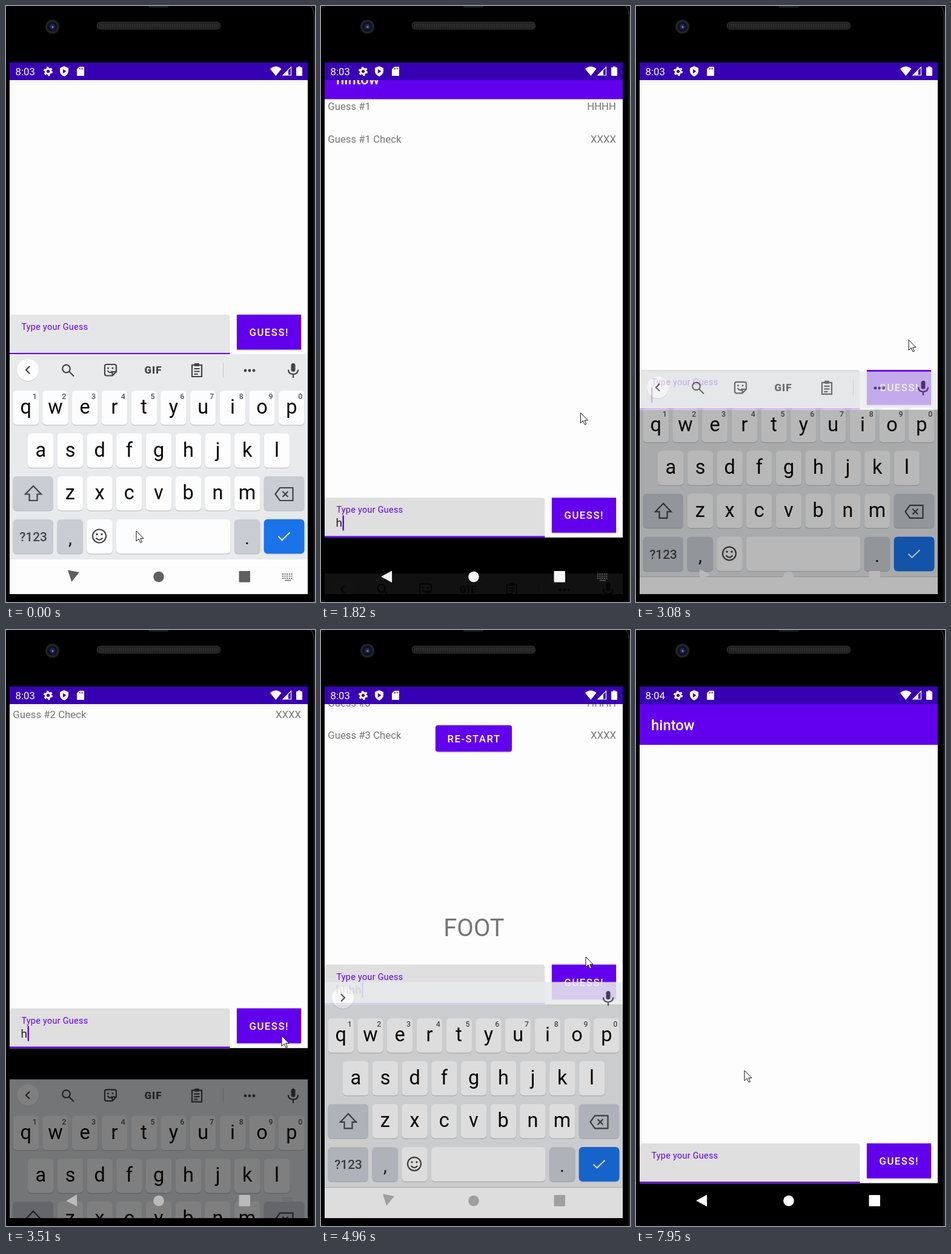
Animation, 510 px wide and 981 px high, one loop 8000 ms. Source, as an HTML page:

```html
<!DOCTYPE html>
<html lang="en">
<head>
<meta charset="utf-8">
<title>Word guessing app</title>
<style>
html, body { margin: 0; width: 100%; height: 100%; overflow: hidden; background: #000; }
svg { display: block; }
text { font-family: Roboto, sans-serif; white-space: pre; }
.medium { font-weight: 500; }
.button { font: 500 16.75px Roboto, sans-serif; letter-spacing: 1.5px; fill: #fff; }
.raised { filter: drop-shadow(0 1.5px 1px #0004); }
.line { fill: none; stroke: #444; stroke-width: 2.2; }
</style>
</head>
<body>
<svg id="stage" width="510" height="981" viewBox="0 0 510 981"></svg>
<script>
const LOOP = 8000, PAN = 337, KEYBOARD = 395, SLIDE = 300;
const PURPLE = '#6200ee', GREY = '#757575', DARK = '#444';

const text = (x, y, size, str, fill, extra = '') =>
  `<text x="${x}" y="${y}" font-size="${size}" fill="${fill}" ${extra}>${str}</text>`;
const rect = (x, y, w, h, fill, extra = '') =>
  `<rect x="${x}" y="${y}" width="${w}" height="${h}" fill="${fill}" ${extra}/>`;
const circle = (x, y, r, fill, extra = '') =>
  `<circle cx="${x}" cy="${y}" r="${r}" fill="${fill}" ${extra}/>`;
const path = (d, extra = 'class="line"') => `<path d="${d}" ${extra}/>`;
const MIDDLE = 'text-anchor="middle"', END = 'text-anchor="end"';

const key = (x, y, w = 42.6, fill = '#fdfdfd', shadow = '#b4b6ba') =>
  rect(x, y + 1, w, 56.5, shadow, 'rx="6"') + rect(x, y, w, 56.5, fill, 'rx="6"');
const letters = (str, x, y, hints = '') => [...str].map((c, i) => {
  const left = x + i * 48.72;
  return key(left, y) + text(left + 21.3, y + 38, 32.5, c, '#050505', MIDDLE) +
    (hints ? text(left + 35.7, y + 14, 12.5, hints[i], '#555', MIDDLE + ' class="medium"') : '');
}).join('');

const device =
  rect(235, -4, 33, 7, '#1c1c1c', 'rx="3"') +
  path('M503 0Q508 4 508.5 16V981', 'fill="none" stroke="#262626" stroke-width="2"') +
  circle(76.5, 34, 11.5, '#222325') + circle(76.5, 34, 8, '#10131f') +
  circle(76.5, 34, 4.2, '#1f2a60') + circle(77, 34.5, 1.5, '#7480c8') +
  rect(150.5, 26.5, 203, 11.5, '#1c1c1c', 'rx="5" stroke="#3c3c3c"') +
  path('M154 32.2H351', 'stroke="#333" stroke-width="7" stroke-dasharray="1.5 1.5"');

const rows = [1, 2, 3].map(n => {
  const y = 207 + (n - 1) * 106.6;
  return `<g id="guess${n}">` +
    text(11.3, y, 16.75, `Guess #${n}`, GREY) + text(487, y, 16.75, 'HHHH', GREY, END) +
    text(11.3, y + 53.3, 16.75, `Guess #${n} Check`, GREY) +
    text(487, y + 53.3, 16.75, 'XXXX', GREY, END) + '</g>';
}).join('');

const app = '<g id="app">' + rect(6, 122, 492, 788.5, '#fdfdfd') + rows +
  rect(6, 122, 492, 67, PURPLE) + text(25, 164.5, 23.9, 'hintow', '#fff', 'class="medium"') +
  '<g id="result">' + rect(189, 451, 126, 43.5, PURPLE, 'id="restart" rx="4" class="raised"') +
  text(208.5, 479, 16.75, 'RE-START', '#fff', 'class="button"') +
  text(252.5, 798, 40, 'FOOT', GREY, MIDDLE) + '</g>' +
  path('M6 910.5V850q0-5 5-5H364.5q5 0 5 5v60.5z', 'id="field"') + rect(6, 908, 363.5, 2.5, PURPLE) +
  text(25.4, 870, 14.36, 'Type your Guess', PURPLE, 'letter-spacing=".3"') +
  text(24.6, 893, 19.15, '', '#222', 'id="input"') +
  rect(25, 895, 0, 1, '#222', 'id="underline"') + rect(0, 874, 2.4, 25, PURPLE, 'id="caret"') +
  rect(381, 845, 106, 57.5, PURPLE, 'class="raised"') +
  text(401.5, 880, 16.75, 'GUESS!', '#fff', 'class="button"') + '</g>';

const tools = '<g id="tools">' + path('M39 593l-6 6 6 6') +
  circle(99.5, 597, 6.3, 'none', 'class="line"') + path('M104 601.5l8 8') +
  path('M166 590H179q3 0 3 3V602l-6.5 6.5H166q-3 0-3-3V593q0-3 3-3zM175.5 608V602H182M167.5 600q4 6 8 1') +
  circle(168.5, 596, 1.5, DARK) + circle(176, 596, 1.5, DARK) +
  text(243, 605, 17, 'GIF', DARK, MIDDLE + ' font-weight="900" letter-spacing="1"') +
  path('M307 591H323V610H307zM310.5 597H319.5M310.5 601.5H319.5M310.5 606H316.5') +
  rect(311, 588, 8, 5, DARK, 'rx="1"') + rect(358, 587, 1, 25, '#c4c6ca') +
  [395, 402, 409].map(x => circle(x, 600, 2.4, DARK)).join('') + '</g>' +
  '<g id="arrow">' + path('M33 593l6 6-6 6') + '</g><g id="candidates">' +
  text(114.5, 607, 21.3, 'hhhh', DARK, MIDDLE) + text(250.5, 607, 21.3, 'ghhh', DARK, MIDDLE) +
  rect(178.5, 585, 1, 28, '#b8babd') + rect(322.5, 585, 1, 28, '#b8babd') + '</g>' +
  rect(470.5, 588, 7, 14, DARK, 'rx="3.5"') + path('M466 598.5q0 7.5 8 7.5t8-7.5M474 606v6');

const FUNC = '#c9ccd3';
const keyboard = '<g id="keyboard">' + rect(6, 573, 492, 338, '#e8eaec') +
  rect(6, 911, 492, 57, '#fdfdfd') + circle(36, 600, 18, '#c8cacd') + circle(36, 599, 18, '#fdfdfd') + tools +
  letters('qwertyuiop', 11.5, 633, '1234567890') + letters('asdfghjkl', 36, 703.5) +
  letters('zxcvbnm', 84.5, 774) +
  key(11.5, 774, 66.5, FUNC) + path('M45 790L58 803.5H51.5V814H38.5V803.5H32Z') +
  key(425.7, 774, 66.5, FUNC) + path('M452 793H473.5V814H452L444.5 803.5ZM456.5 799l9 9m0-9l-9 9') +
  key(11.5, 845, 66.5, FUNC) + text(45, 881, 20.8, '?123', DARK, MIDDLE + ' class="medium"') +
  key(84.5, 845, 42.6, FUNC) + text(106, 886, 30, ',', '#111', MIDDLE) +
  key(133.2, 845) + circle(154, 872.5, 11, 'none', 'class="line"') +
  circle(150, 869.5, 1.7, DARK) + circle(158, 869.5, 1.7, DARK) + path('M148.5 875.5q5.5 6.5 11 0') +
  key(182, 845, 188.5) + key(376.8, 845, 42.6, FUNC) + text(398, 886, 30, '.', '#111', MIDDLE) +
  key(425.7, 844.7, 66.7, '#1a73e8', '#8fb0dc') +
  path('M449.5 873l6 6 13-12.5', 'fill="none" stroke="#fff" stroke-width="2"') + '</g>';

const nav = '<g id="nav">' + path('M-9.6 1.2L8.3 -8.5V10.9Z', 'id="back"') +
  '<circle cx="252" cy="939.5" r="8.8"/>' +
  '<rect x="384.5" y="930" width="18.5" height="18.5" rx="1"/>' +
  '<g id="switcher">' + [935, 938.5, 942].map(y =>
    path(`M456 ${y}H474`, 'stroke="#666" stroke-width="2" stroke-dasharray="2 1.6"')).join('') +
  path('M460 945.5H470', 'stroke="#666" stroke-width="1.5"') + '</g></g>';

const status = rect(6, 93, 492, 29, '#3700b3') + text(15.6, 114, 16.75, '', '#fff', 'id="clock"') +
  circle(69.5, 107.5, 4.2, 'none', 'stroke="#fff" stroke-width="3.2"') +
  circle(69.5, 107.5, 6.3, 'none', 'stroke="#fff" stroke-width="2.6" stroke-dasharray="3.3"') +
  path('M96 99l7 3v5q0 6-7 9q-7-3-7-9v-5z', 'fill="#fff"') + path('M94 104l5.5 3.5-5.5 3.5z', 'fill="#3700b3"') +
  path('M121 100h8v15h-12v-11z', 'fill="#fff"') + path('M121.5 101.5v3m2.5-3v3m2.5-3v3', 'stroke="#3700b3"') +
  path('M436 103.5q9.5-8 18.5 0L445.3 115z', 'fill="#fff"') +
  path('M470.5 100.5V114H457z', 'fill="none" stroke="#fff" stroke-width="1.2"') +
  path('M466 105V114H457z', 'fill="#fff"') +
  rect(479, 101, 10, 14, '#fff', 'rx="1"') + rect(482, 99.5, 4, 2, '#fff');

const pointer = path('M0 0V17L4 13L7 19.5L9.5 18.3L6.7 12.3H12Z',
  'id="pointer" fill="#fff" stroke="#111"');

document.getElementById('stage').innerHTML = device +
  `<svg x="6" y="93" width="492" height="875" viewBox="6 93 492 875">${app + keyboard + nav + status}</svg>` + pointer;

// [time, 1 = keyboard closes, 0 = keyboard opens]
const slides = [[-310, 0], [1420, 1], [1800, 0], [3000, 1], [3360, 0], [4923, 1]];
// [time, letters in the field]
const typing = [[0, 0], [400, 1], [560, 2], [750, 3], [950, 4], [1440, 0], [1800, 1], [2050, 2],
  [2300, 3], [2480, 4], [3020, 0], [3440, 1], [3750, 2], [3950, 3], [4150, 4], [7000, 0]];
// [time, x, y]
const moves = [[0, 215, 864], [200, 215, 864], [1100, 450, 548], [1500, 450, 548], [2120, 409, 779],
  [2800, 450, 548], [3050, 450, 548], [3510, 455, 668], [4400, 450, 548], [4800, 450, 548],
  [4960, 437, 538], [5560, 326, 446], [5960, 256, 487], [6720, 256, 487], [7000, 250, 495],
  [7400, 250, 495], [7950, 179, 725], [8000, 179, 725]];

const clamp = v => Math.min(1, Math.max(0, v));
const smooth = v => v * v * (3 - 2 * v);
const latest = (list, t) => list.findLast(item => item[0] <= t);
const $ = id => document.getElementById(id);
const set = (id, name, value) => $(id).setAttribute(name, value);
const show = (id, on) => set(id, 'visibility', on ? 'visible' : 'hidden');

function caretOn(t) {
  if (t < 150) return false;
  if (t < 5240) return true;
  if (t < 7000) return Math.floor((t - 5240) / 500) % 2 === 1;
  return t >= 7400 && t < 7900;
}

function draw(t) {
  const [start, closing] = latest(slides, t);
  const p = clamp((t - start) / SLIDE);
  const hidden = closing ? p : 1 - p;
  const drop = hidden ** (closing ? 2 : 1.233);
  const unpan = closing ? hidden : hidden ** 1.54;
  const turn = closing ? p : smooth(1 - clamp((t - start - 130) / 230));

  set('app', 'transform', `translate(0 ${-PAN * (1 - unpan)})`);
  set('keyboard', 'transform', `translate(0 ${KEYBOARD * drop})`);
  set('keyboard', 'opacity', 1 - hidden);
  const shade = Math.round(96 + 159 * hidden ** (closing ? 0.45 : 0.8));
  set('nav', 'fill', `rgb(${shade},${shade},${shade})`);
  set('back', 'transform', `translate(108.8 938.1) rotate(${-90 * (1 - turn)})`);
  show('switcher', !closing);

  const count = latest(typing, t)[1];
  $('input').textContent = 'h'.repeat(count);
  set('underline', 'width', hidden ? 0 : [0, 0, 1, 3, 4][count] * 10.55);
  set('caret', 'x', 25 + count * 10.55);
  show('caret', caretOn(t));
  set('field', 'fill', t < 150 ? '#e5e6e8' : '#dfdfdf');
  show('tools', count < 4);
  show('arrow', count === 4);
  show('candidates', count === 4 && !closing);

  [1440, 3020, 4900].forEach((from, i) => show('guess' + (i + 1), t >= from && t < 7000));
  show('result', t >= 4900 && t < 7000);
  set('restart', 'fill', t > 6380 && t < 6720 ? '#7521f0' : PURPLE);
  $('clock').textContent = t < 7700 ? '8:03' : '8:04';

  const i = moves.findLastIndex(m => m[0] <= t);
  const [a, b] = [moves[i], moves[i + 1]];
  const k = smooth((t - a[0]) / (b[0] - a[0]));
  set('pointer', 'transform', `translate(${a[1] + (b[1] - a[1]) * k} ${a[2] + (b[2] - a[2]) * k})`);
}

function frame() {
  draw(performance.now() % LOOP);
  requestAnimationFrame(frame);
}
frame();
</script>
</body>
</html>
```
